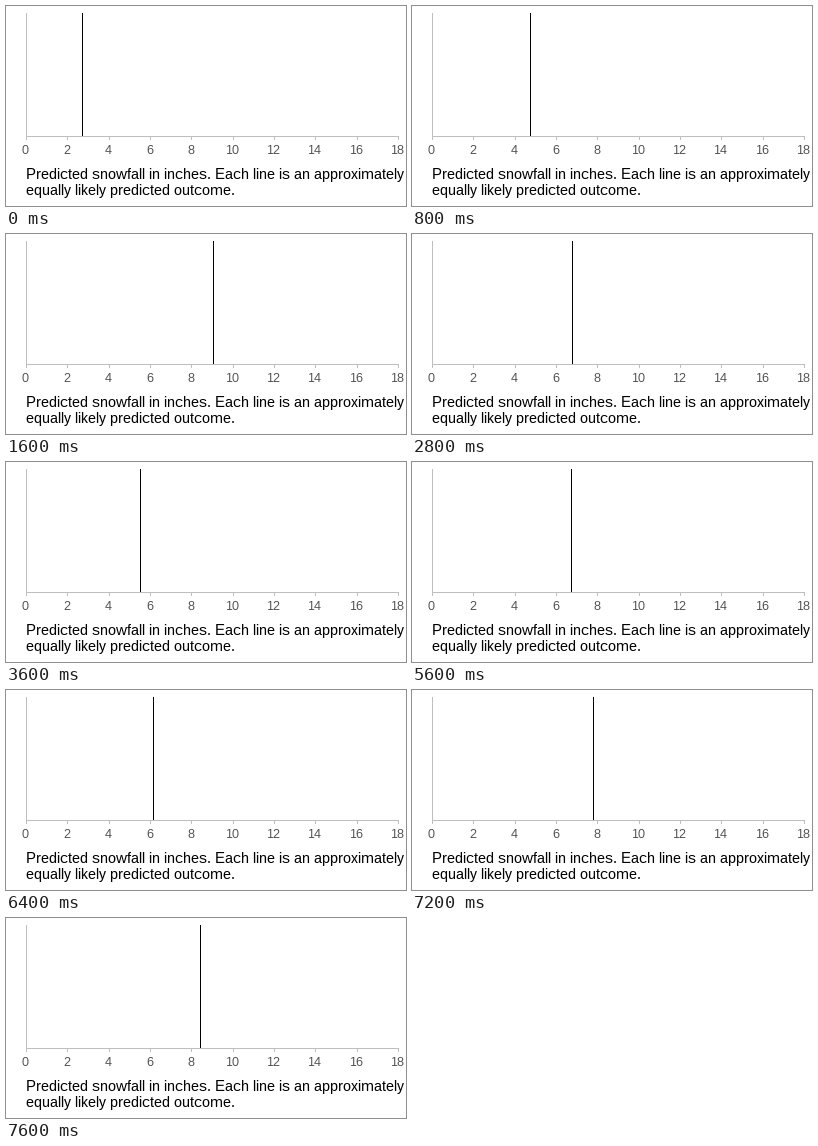
A matplotlib script that plays this animation: 400x200 px, repeating every 8000 ms.

```python
import matplotlib.pyplot as plt
from matplotlib.animation import FuncAnimation
from matplotlib.patches import Rectangle

WIDTH, HEIGHT, DPI = 400, 200, 80
STEP_MS = 400
AXIS_COLOR, LABEL_COLOR = "#bebebe", "#4d4d4d"
TOP, BASE = 7, 130
LEFT, RIGHT, TICK_COUNT = 20, 392, 10
DIGIT_WIDTH = 7

# Pixel column of each predicted outcome, one per step.
OUTCOMES = [76, 312, 118, 126, 207, 87, 137, 160, 155, 134,
            156, 103, 129, 23, 159, 232, 147, 115, 181, 194]

# Fully hinted glyphs on whole-pixel advances.
plt.rcParams.update({"font.family": "Liberation Sans",
                     "text.hinting": "native",
                     "text.hinting_factor": 1})

fig = plt.figure(figsize=(WIDTH / DPI, HEIGHT / DPI), dpi=DPI, facecolor="white")
ax = fig.add_axes([0, 0, 1, 1])
ax.set(xlim=(0, WIDTH), ylim=(HEIGHT, 0))
ax.axis("off")


def bar(x, y, width, height, color):
    """Add a crisp, pixel-aligned rectangle."""
    return ax.add_patch(Rectangle((x, y), width, height, facecolor=color,
                                  linewidth=0, antialiased=False))


def label(x, baseline, text, size_px, color="black"):
    ax.text(x, baseline, text, fontsize=size_px * 72 / DPI, color=color,
            ha="left", va="baseline")


bar(LEFT, TOP, 1, BASE - TOP, AXIS_COLOR)
bar(LEFT, BASE, RIGHT - LEFT + 1, 1, AXIS_COLOR)
for k in range(TICK_COUNT):
    x = round(LEFT + (RIGHT - LEFT) * k / (TICK_COUNT - 1))
    text = str(2 * k)
    bar(x, BASE + 1, 1, 3, AXIS_COLOR)
    label(x - (DIGIT_WIDTH * len(text) + 1) // 2, 148, text, 12, LABEL_COLOR)

label(20, 173, "Predicted snowfall in inches. Each line is an approximately", 15)
label(20, 189, "equally likely predicted outcome.", 15)

outcome = bar(OUTCOMES[0], TOP, 1, BASE - TOP, "black")


def update(frame):
    outcome.set_x(OUTCOMES[frame])
    return (outcome,)


animation = FuncAnimation(fig, update, frames=len(OUTCOMES), interval=STEP_MS,
                          repeat=True, repeat_delay=0)
plt.show()
```
